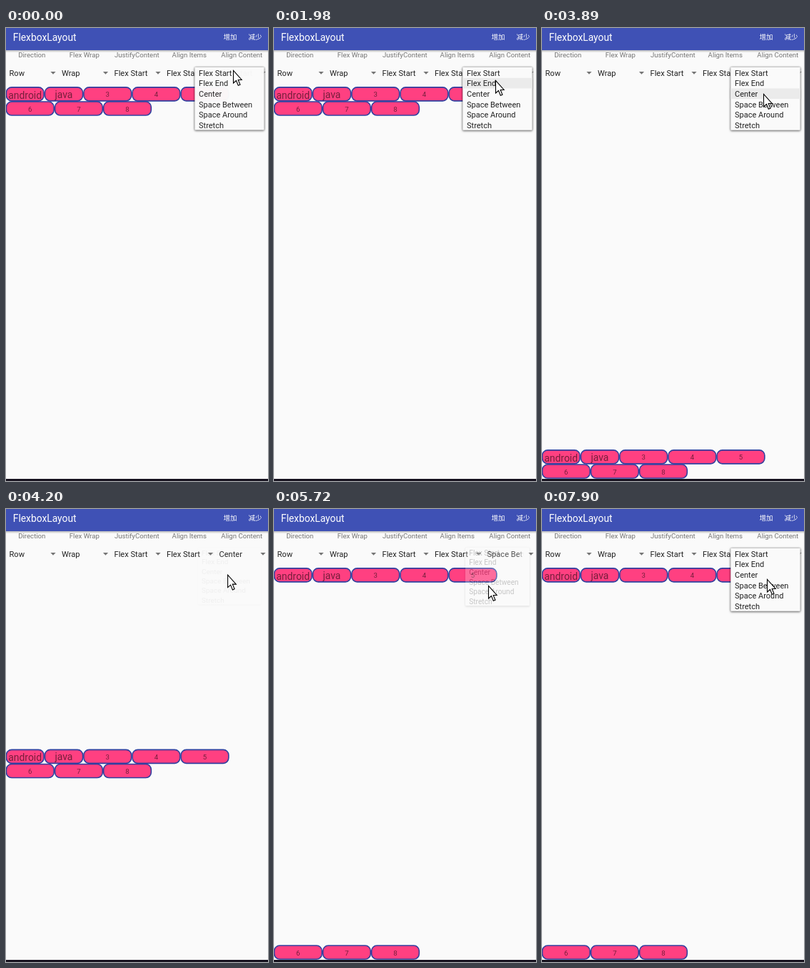
Recreate the animation shown at these times as an HTML page. Size 367 by 633 pixels, loop 8 s.

```html
<!DOCTYPE html>
<html lang="en">
<head>
<meta charset="utf-8">
<title>FlexboxLayout</title>
<style>
html, body { margin: 0; width: 100%; height: 100%; overflow: hidden; background: #fafafa; }
svg { display: block; width: 100vw; height: 100vh; font-family: Roboto, sans-serif; }
.title { font-size: 13.8px; fill: #fff; }
.action { font-size: 9.5px; fill: #fff; font-family: "Noto Sans CJK SC", "Noto Sans CJK", sans-serif; }
.label { font-size: 9.65px; fill: #757575; }
.value { font-size: 11.1px; fill: #212121; }
.option { font-size: 11px; fill: #212121; }
.num { font-size: 9.65px; fill: rgba(0,0,0,.54); }
.word { font-size: 13.9px; fill: rgba(0,0,0,.54); }
.mid { text-anchor: middle; }
.box { fill: #ff4081; stroke: #303f9f; stroke-width: 1.6; }
#popup { filter: drop-shadow(0 0 .8px rgba(0,0,0,.4)) drop-shadow(0 1.6px 1.8px rgba(0,0,0,.5)); }
</style>
</head>
<body>
<svg id="stage" viewBox="0 0 367 633" preserveAspectRatio="none">
  <defs>
    <linearGradient id="shade" x2="0" y2="1">
      <stop stop-color="#000" stop-opacity=".25"/>
      <stop offset="1" stop-color="#000" stop-opacity="0"/>
    </linearGradient>
    <linearGradient id="edge">
      <stop stop-color="#fafafa" stop-opacity="0"/>
      <stop offset="1" stop-color="#fafafa"/>
    </linearGradient>
    <clipPath id="clip"><rect x="295" y="50" width="54.5" height="26"/></clipPath>
  </defs>
  <rect width="367" height="633" fill="#fafafa"/>
  <g id="rows"></g>
  <rect y="31" width="367" height="3.5" fill="url(#shade)"/>
  <rect width="367" height="31" fill="#3f51b5"/>
  <text class="title" x="9.8" y="18">FlexboxLayout</text>
  <text class="action mid" x="314" y="16">增加</text>
  <text class="action mid" x="349" y="16">减少</text>
  <g id="head"></g>
  <rect y="630" width="367" height="3" fill="#17131f"/>
  <g id="popup"></g>
  <path id="cursor" d="M.5 .5V18L4.5 14.5L7.3 21.3L10 20.2L7.2 13.5H12.2Z" fill="#fff" stroke="#000" stroke-width="1.1"/>
</svg>
<script>
const LOOP = 8000, PITCH = 14.6, FREE = 507;
const $ = id => document.getElementById(id);

function add(parent, tag, attrs, text) {
  const el = document.createElementNS("http://www.w3.org/2000/svg", tag);
  for (const k in attrs) el.setAttribute(k, attrs[k]);
  if (text) el.textContent = text;
  return parent.appendChild(el);
}

// Chips: text, width, class, baseline
function chipRow(y, chips) {
  const g = add($("rows"), "g", {});
  let x = -0.3;
  for (const [text, w, cls, base] of chips) {
    add(g, "rect", { class: "box", x: x + .75, y: y + .75, width: w - 1.4, height: 19, rx: 7.5 });
    add(g, "text", { class: cls + " mid", x: x + w / 2, y: y + base }, text);
    x += w;
  }
  return g;
}
const num = n => [String(n), 68.1, "num", 14.2];
const row1 = chipRow(82.1, [["android", 54, "word", 16.8], ["java", 54.5, "word", 15.8], num(3), num(4), num(5)]);
const row2 = chipRow(102.3, [num(6), num(7), num(8)]);

// Spinners
const labels = ["Direction", "Flex Wrap", "JustifyContent", "Align Items", "Align Content"];
const values = ["Row", "Wrap", "Flex Start", "Flex Start", "Flex Start"];
let value, arrow;
labels.forEach((label, i) => {
  const x = i * 73.5, head = $("head");
  add(head, "text", { class: "label mid", x: 36.3 + x, y: 41.2 }, label);
  const slot = i === 4 ? add(head, "g", { "clip-path": "url(#clip)" }) : head;
  value = add(slot, "text", { class: "value", x: 4.5 + x, y: 67 }, values[i]);
  arrow = add(head, "path", { d: `M${62.4 + x} 61h7.2l-3.6 3.8z`, fill: "#757575" });
});
add($("head"), "rect", { x: 342, y: 55, width: 8, height: 17, fill: "url(#edge)" });

// Dropdown
const options = ["Flex Start", "Flex End", "Center", "Space Between", "Space Around", "Stretch"];
const popup = $("popup");
add(popup, "rect", { x: 264.3, y: 54.8, width: 97.4, height: 88, rx: 1, fill: "#fafafa" });
const press = add(popup, "rect", { x: 264.3, width: 97.4, height: PITCH, fill: "#ebebeb" });
options.forEach((name, i) =>
  add(popup, "text", { class: "option", x: 270, y: Math.round(66.8 + i * PITCH) }, name));

// Each visit to the dropdown picks the next option
const visits = [
  { touch: -200, open: -136, pick: 2115 },
  { touch: 2945, open: 2947, pick: 4035 },
  { touch: 4760, open: 4801, pick: 5710 },
  { touch: 7350, open: 7640, pick: Infinity }
];
// Share of the free height above each chip row, by chosen option
const above1 = [0, 1, .5, 0], above2 = [0, 1, .5, 1];

// Pointer moves: start, end, x, y
const moves = [
  [740, 890, 317.5, 65], [1160, 1850, 310, 73], [2120, 2360, 317, 62.5], [3220, 3760, 310, 92],
  [4170, 4620, 318, 64], [4780, 4930, 319, 77], [5060, 5460, 300, 107],
  [6140, 6950, 318, 66], [7630, 7900, 315, 98]
];

const clamp = v => Math.max(0, Math.min(1, v));
const ease = p => p * p * (3 - 2 * p);

function pointerAt(t) {
  let x = 318, y = 59;
  for (const [a, b, tx, ty] of moves) {
    const p = ease(clamp((t - a) / (b - a)));
    x += (tx - x) * p;
    y += (ty - y) * p;
  }
  return [x, y];
}

// Opens evenly; on a pick it turns faint at once, then fades out
const alphaOf = (v, t) =>
  t < v.pick ? clamp((t - v.open) / 140) : .25 * clamp(1 - (t - v.pick) / 200);

function draw(t) {
  const [x, y] = pointerAt(t);
  $("cursor").setAttribute("transform", `translate(${x} ${y})`);

  const chosen = visits.filter(v => v.pick <= t).length;
  value.textContent = options[chosen];
  row1.setAttribute("transform", `translate(0 ${above1[chosen] * FREE})`);
  row2.setAttribute("transform", `translate(0 ${above2[chosen] * FREE})`);

  const touched = visits.some(v => t >= v.touch && t < v.open + 60);
  arrow.setAttribute("fill", touched ? "#ff4081" : "#757575");

  const alpha = Math.max(...visits.map(v => alphaOf(v, t)));
  popup.setAttribute("opacity", alpha);
  popup.setAttribute("transform", `translate(313 43) scale(${.9 + .1 * alpha}) translate(-313 -43)`);

  const hit = visits.findIndex(v => t >= v.pick - 150 && t < v.pick);
  press.setAttribute("opacity", hit < 0 ? 0 : 1);
  press.setAttribute("y", 55.2 + (hit + 1) * PITCH);
}

const start = performance.now();
function loop() {
  draw((performance.now() - start) % LOOP);
  requestAnimationFrame(loop);
}
loop();
</script>
</body>
</html>
```
